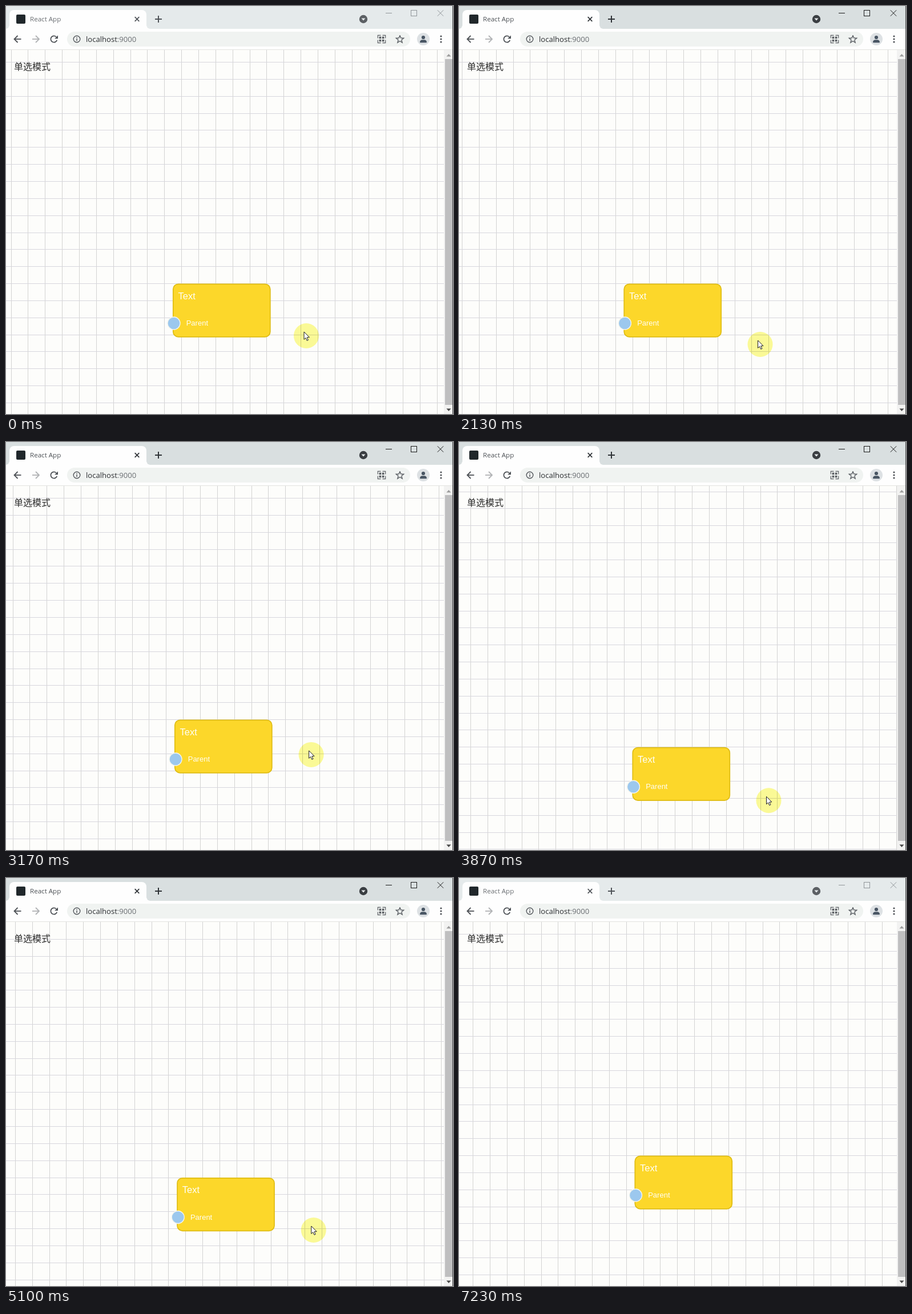
An HTML page with a canvas for the animation above (7260 ms loop, 783 by 715 pixels).

```html
<!DOCTYPE html>
<html lang="zh">
<head>
<meta charset="utf-8">
<title>Canvas drag</title>
<style>
html, body { margin: 0; width: 100%; height: 100%; overflow: hidden; background: #fff; }
canvas { display: block; width: 783px; height: 715px; }
</style>
</head>
<body>
<canvas id="stage" width="783" height="715"></canvas>
<script>
const ctx = document.getElementById('stage').getContext('2d');
const W = 783, H = 715, LOOP = 7260;
const PRESS = 970, RELEASE = 5900, BLUR = 7130, LAG = 45;
const GRID = 29.85, TOP = 77;

// pointer tip: time, x, y
const path = [
  [0, 522, 571], [700, 527, 583], [970, 527, 583], [1470, 524, 550],
  [1750, 523, 500], [2500, 524.5, 668], [2670, 525, 660], [3200, 531, 540],
  [3650, 538, 660], [3870, 538.5, 621.5], [4200, 537, 540], [4570, 532, 636],
  [4750, 532, 668], [5300, 537, 560], [5900, 542.5, 410], [5970, 537, 408],
  [6100, 537, 402], [6800, 541, 73], [7100, 543, -40], [7260, 543, -60]
];

const slope = (i, c) => (path[i + 1][c] - path[i][c]) / (path[i + 1][0] - path[i][0]);

// harmonic tangents keep the curve from overshooting
function tangent(i, c) {
  if (i === 0 || i === path.length - 1) return 0;
  const a = slope(i - 1, c), b = slope(i, c);
  return a * b > 0 ? 2 * a * b / (a + b) : 0;
}

function along(t, c) {
  let i = 0;
  while (i < path.length - 2 && t >= path[i + 1][0]) i++;
  const p = path[i], q = path[i + 1], d = q[0] - p[0], u = (t - p[0]) / d;
  const u2 = u * u, u3 = u2 * u;
  return (2 * u3 - 3 * u2 + 1) * p[c] + (3 * u2 - 2 * u3) * q[c] +
    (u3 - 2 * u2 + u) * d * tangent(i, c) + (u3 - u2) * d * tangent(i + 1, c);
}

const tip = t => ({ x: along(t, 1), y: along(t, 2) });

function pan(t) {
  const p = tip(Math.min(Math.max(t - LAG, PRESS), RELEASE));
  return { x: p.x - 527, y: Math.max(0, p.y - 583) };
}

function box(x, y, w, h, color) {
  ctx.fillStyle = color;
  ctx.fillRect(x, y, w, h);
}

function pill(x, y, w, h, r, color) {
  ctx.beginPath();
  ctx.roundRect(x, y, w, h, r);
  ctx.fillStyle = color;
  ctx.fill();
}

function disc(x, y, r, color) {
  ctx.beginPath();
  ctx.arc(x, y, r, 0, Math.PI * 2);
  ctx.fillStyle = color;
  ctx.fill();
}

function ring(x, y, r, color, width) {
  ctx.beginPath();
  ctx.arc(x, y, r, 0, Math.PI * 2);
  ctx.strokeStyle = color;
  ctx.lineWidth = width;
  ctx.stroke();
}

function trace(points) {
  ctx.beginPath();
  points.forEach(([x, y], i) => i ? ctx.lineTo(x, y) : ctx.moveTo(x, y));
}

function line(points, color, width) {
  trace(points);
  ctx.strokeStyle = color;
  ctx.lineWidth = width;
  ctx.stroke();
}

function shape(points, color) {
  trace(points);
  ctx.closePath();
  ctx.fillStyle = color;
  ctx.fill();
}

function label(text, x, y, font, color) {
  ctx.font = font;
  ctx.fillStyle = color;
  ctx.fillText(text, x, y);
  return x + ctx.measureText(text).width;
}

function cross(x, y, r, color, width) {
  line([[x - r, y - r], [x + r, y + r]], color, width);
  line([[x + r, y - r], [x - r, y + r]], color, width);
}

function arrow(x, y, dir, color) {
  line([[x - 6 * dir, y], [x + 6 * dir, y]], color, 1.8);
  line([[x, y - 6], [x - 6 * dir, y], [x, y + 6]], color, 1.8);
}

function drawTabs(active) {
  box(0, 0, W, 41, active ? '#d9dfe0' : '#e5eaeb');
  const tab = '#fefefe';
  pill(6, 7, 240, 40, 8, tab);
  shape([[0, 40], [4, 38.5], [6, 34], [6, 41], [0, 41]], tab);
  shape([[252, 40], [248, 38.5], [246, 34], [246, 41], [252, 41]], tab);
  pill(18, 15, 16, 16, 2, '#20272b');
  label('React App', 42, 27, '11.6px "Open Sans", "Noto Sans", sans-serif', active ? '#4b4f54' : '#686c70');
  const ink = active ? '#303438' : '#505459';
  cross(229.5, 23, 3.8, ink, 1.7);
  line([[261, 23], [273, 23]], ink, 2);
  line([[267, 17], [267, 29]], ink, 2);
  disc(626, 23, 7.2, active ? '#3a3e42' : '#5c6064');
  shape([[622.5, 21.5], [629.5, 21.5], [626, 25.5]], '#e8ecee');
  const win = active ? '#1a1a1a' : '#91969a';
  line([[665, 12.5], [676, 12.5]], win, 1);
  ctx.strokeRect(709.5, 7.5, 10, 10);
  cross(761, 12.5, 5.2, win, 1);
}

function drawToolbar() {
  box(0, 40, W, 36, '#fefefe');
  box(0, 76, W, 1, '#e2e3e0');
  arrow(20.5, 58, 1, '#4d5156');
  arrow(52, 58, -1, '#b1b3b5');

  ctx.beginPath();
  ctx.arc(84, 58, 5.6, 0.35, Math.PI * 1.75);
  ctx.strokeStyle = '#4d5156';
  ctx.lineWidth = 1.8;
  ctx.stroke();
  shape([[91, 51.5], [91, 57.2], [85.2, 57.2]], '#4d5156');

  pill(107, 45, 601, 26, 13, '#f0f3f1');
  ring(124, 58, 5.8, '#54585d', 1.4);
  box(123.3, 57, 1.5, 4.2, '#54585d');
  box(123.3, 54.5, 1.5, 1.5, '#54585d');
  const url = '13.1px "Open Sans", "Noto Sans", sans-serif';
  const end = label('localhost', 140, 62.5, url, '#2a2d30');
  label(':9000', end, 62.5, url, '#6a6e72');

  const gray = '#5a5e63';
  for (const sx of [-1, 1]) for (const sy of [-1, 1]) {
    box(658 + sx * 2.6 - 1.8, 58 + sy * 2.6 - 1.8, 3.6, 3.6, gray);
    line([[658 + sx * 1.5, 58 + sy * 6.7], [658 + sx * 6.7, 58 + sy * 6.7],
      [658 + sx * 6.7, 58 + sy * 1.5]], gray, 1.2);
  }

  const star = [];
  for (let i = 0; i < 11; i++) {
    const a = -Math.PI / 2 + i * Math.PI / 5, r = i % 2 ? 3 : 7;
    star.push([690 + r * Math.cos(a), 58.5 + r * Math.sin(a)]);
  }
  line(star, gray, 1.4);

  disc(731, 58, 11, '#dde1e4');
  disc(731, 55, 3.1, '#485563');
  pill(725, 59.3, 12, 5, [5, 5, 1, 1], '#485563');
  for (const y of [53, 58, 63]) disc(762, y, 1.6, '#4d5156');
}

function drawGrid(p) {
  box(0, TOP, 768, H - TOP, '#fdfdfb');
  const wrap = v => ((v % GRID) + GRID) % GRID;
  for (let x = wrap(9 + p.x); x < 767; x += GRID)
    box(Math.round(x - 0.4), TOP, 1, H - TOP, '#d3d3d2');
  for (let y = TOP + wrap(98 + p.y - TOP); y < H; y += GRID)
    box(0, Math.round(y), 767, 1, '#d7d6dd');
}

function drawNode(p) {
  ctx.save();
  ctx.translate(292 + p.x, 487 + p.y);
  pill(0.8, 0.3, 170, 92.5, 9, '#fcd72a');
  ctx.strokeStyle = '#dfbd14';
  ctx.lineWidth = 1.7;
  ctx.stroke();
  const face = 'px "Liberation Sans", Arial, sans-serif';
  label('Text', 9.6, 26.7, '16.5' + face, '#fffef5');
  label('Parent', 23.7, 73, '13' + face, '#fffef5');
  disc(2, 69, 11, '#9cc8ee');
  ring(2, 69, 11, '#f4f5ee', 1.3);
  ctx.restore();
}

function drawScrollbar() {
  box(767, TOP, 16, H - TOP, '#f2f2f1');
  box(769, 93, 13, 606, '#bfbfc0');
  shape([[771.5, 88.5], [775.5, 84], [779.5, 88.5]], '#9c9c9c');
  shape([[771.5, 705.5], [779.5, 705.5], [775.5, 710]], '#484848');
}

function drawRipple(t, start) {
  const age = t - start;
  if (age < 0 || age > 200) return;
  const p = tip(start);
  ctx.globalAlpha = Math.min(1, (200 - age) / 120);
  ring(p.x, p.y, 3 + age * 0.07, '#cf9a35', 2.8);
  ctx.globalAlpha = 1;
}

function drawPointer(p) {
  const pts = [[0, 0], [0, 13.4], [3, 10.6], [5.2, 15.4], [7.4, 14.4], [5.2, 9.8], [9.4, 9.6]]
    .map(([x, y]) => [p.x + x, p.y + y]);
  shape(pts, '#fff');
  ctx.strokeStyle = '#1c1c1c';
  ctx.lineWidth = 1;
  ctx.stroke();
}

function draw(t) {
  const p = pan(t), tipAt = tip(t);
  drawGrid(p);
  drawNode(p);
  label('单选模式', 14, 111.5, '16px "Noto Sans CJK SC", "Noto Sans CJK", sans-serif', '#2a2a2a');
  drawScrollbar();
  drawTabs(t >= PRESS && t < BLUR);
  drawToolbar();
  box(782, 0, 1, H, '#4a4a4c');

  ctx.globalCompositeOperation = 'multiply';
  disc(tipAt.x + 4, tipAt.y + 7, 22, '#fcfb98');
  ctx.globalCompositeOperation = 'source-over';
  drawRipple(t, PRESS);
  drawRipple(t, RELEASE);
  drawPointer(tipAt);
}

const begin = performance.now();
function frame() {
  draw((performance.now() - begin) % LOOP);
  requestAnimationFrame(frame);
}
frame();
</script>
</body>
</html>
```
